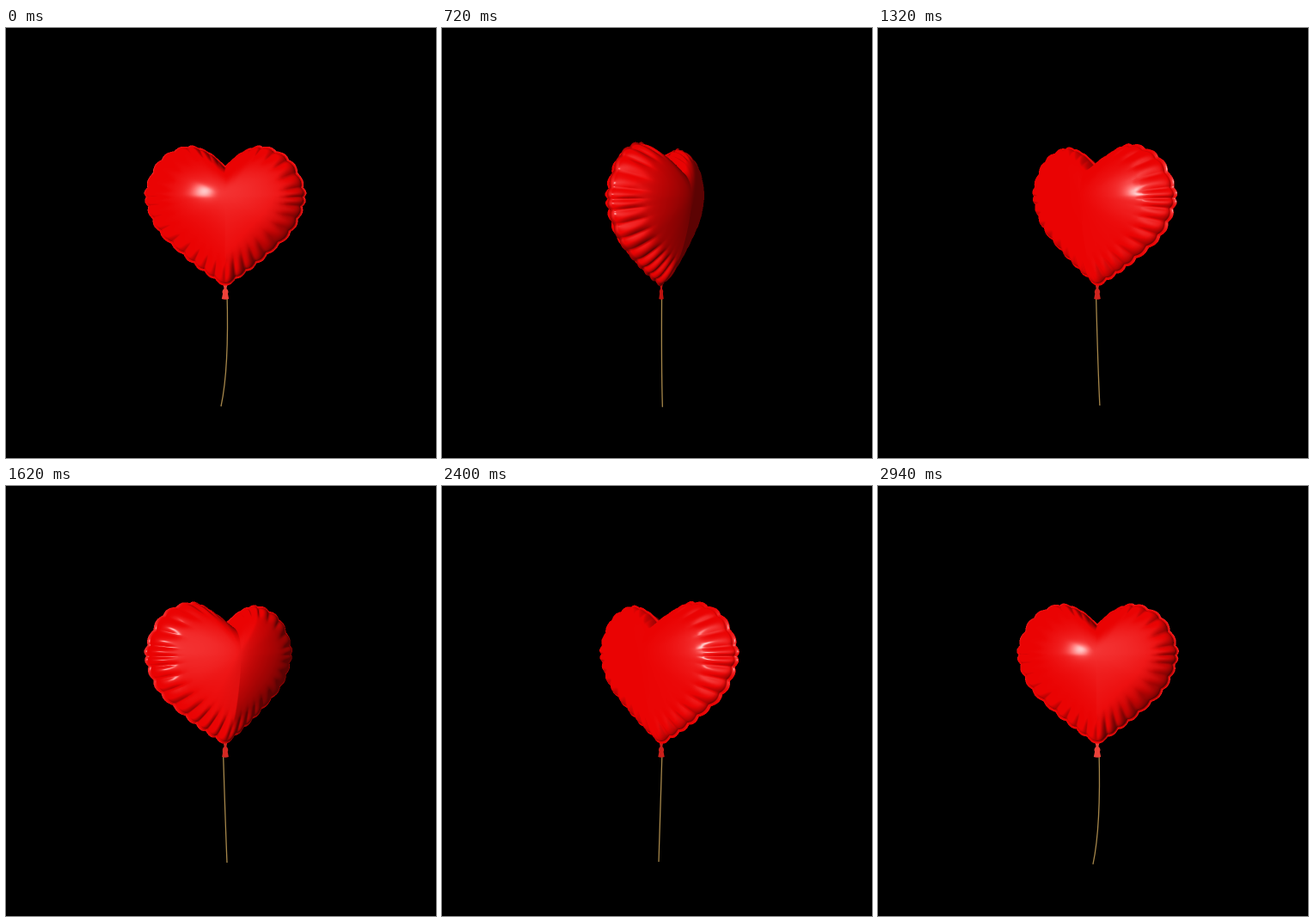
Recreate the animation shown at these times as an HTML page with a canvas. Size 500x500 px, loop 2.97 s.

```html
<!DOCTYPE html>
<html lang="en">
<head>
<meta charset="utf-8">
<title>Heart balloon</title>
<style>
  html, body { margin: 0; width: 100%; height: 100%; overflow: hidden; background: #000; }
  canvas { display: block; width: 500px; height: 500px; }
</style>
</head>
<body>
<canvas id="stage" width="500" height="500"></canvas>
<script>
const LOOP = 2970, STEP = 30;
const CX = 255, CY = 196;              // balloon centre
const EYE_Y = 185, EYE_Z = 420;        // camera height and distance
const DEPTH = 39, CORE = 58, RIM = 3;
const BOX = { x: 145, y: 120, w: 220, h: 190 }, SS = 2;

// time, turn in degrees, string top x, middle x, end x, end y
const poses = [
  [0, 0, 257, 256.5, 250, 440],
  [450, 25, 256, 255, 254, 441],
  [990, 97, 255, 256, 258, 440],
  [1620, 205, 252.5, 255, 257, 438],
  [2040, 277, 254, 253, 255, 437],
  [2400, 328, 256, 253.5, 252, 437]
];
const shifted = (row, dir) => row.map((v, i) => i === 0 ? v + dir * LOOP : i === 1 ? v + dir * 360 : v);
const track = [shifted(poses[5], -1), ...poses, shifted(poses[0], 1), shifted(poses[1], 1)];

// right half of the outline, from notch to tip
const half = [
  [0, 160], [20, 143.5], [45, 136.5], [76, 152], [93, 185],
  [92, 208], [78, 238], [50, 265], [25, 285], [0, 302]
].map(([x, y], i) => [i, x, y - CY]);

// Smooth curve through rows of [t, ...values]
function curve(rows, t) {
  let i = 0;
  while (i < rows.length - 2 && t >= rows[i + 1][0]) i++;
  const a = rows[i], b = rows[i + 1];
  const before = rows[Math.max(0, i - 1)], after = rows[Math.min(rows.length - 1, i + 2)];
  const d = b[0] - a[0], u = (t - a[0]) / d, v = 1 - u;
  return a.slice(1).map((p, k) => {
    const q = b[k + 1];
    const m = (q - before[k + 1]) / (b[0] - before[0]) * d;
    const n = (after[k + 1] - p) / (after[0] - a[0]) * d;
    return p * (1 + 2 * u) * v * v + m * u * v * v + q * u * u * (3 - 2 * u) - n * u * u * v;
  });
}

const clamp = v => Math.max(0, Math.min(1, v));
const smooth = (a, b, v) => { const u = clamp((v - a) / (b - a)); return u * u * (3 - 2 * u); };

// One sheet of foil: rings run outward, the last one is the flat welded rim
const SPAN = half.length - 1, N = SPAN * 32, M = 18, ROWS = M + 2;
const at = (k, j) => ((k + N) % N) * ROWS + j;
const points = [];
for (let k = 0; k < N; k++) {
  const u = k / 16, right = u <= SPAN;
  const [ox, oy] = curve(half, right ? u : 2 * SPAN - u);
  const r = Math.hypot(ox, oy), dx = (right ? ox : -ox) / r, dy = oy / r;
  const pinch = 1 - Math.abs(Math.sin(2 * Math.PI * u));
  const dent = 2.3 * pinch * clamp((r - 43) / 30);
  for (let j = 0; j < ROWS; j++) {
    const s = Math.sin(Math.min(j, M) / M * Math.PI / 2);
    let rad = s * (CORE + (r - RIM - CORE) * s) - dent * s ** 10;
    let z = 0.8 + DEPTH * Math.max(0, 1 - s * s) ** 0.58 * (1 - 0.24 * pinch * smooth(0.74, 0.98, s));
    if (j > M) { rad = r - dent; z = 0; }
    points.push([dx * rad, dy * rad, z]);
  }
}

const normals = points.map((_, i) => {
  const k = Math.floor(i / ROWS), j = i % ROWS;
  if (j === 0) return [0, 0, 1];
  const a = points[at(k - 1, j)], b = points[at(k + 1, j)];
  const c = points[at(k, j - 1)], d = points[at(k, Math.min(ROWS - 1, j + 1))];
  const p = b.map((v, n) => v - a[n]), q = d.map((v, n) => v - c[n]);
  const n = [p[1] * q[2] - p[2] * q[1], p[2] * q[0] - p[0] * q[2], p[0] * q[1] - p[1] * q[0]];
  const len = (Math.hypot(...n) || 1) * (n[2] < 0 ? -1 : 1);
  return n.map(v => v / len);
});

const W = BOX.w * SS, H = BOX.h * SS;
const layer = document.createElement("canvas");
layer.width = W;
layer.height = H;
const layerCtx = layer.getContext("2d");
const image = layerCtx.createImageData(W, H);
const depth = new Float32Array(W * H);
const verts = new Float32Array(points.length * 6);
let glintX, glintZ;

// Turn one sheet (side 1 front, -1 back) and project it
function project(side, turn) {
  const c = Math.cos(turn), s = Math.sin(turn);
  points.forEach(([x, y, z0], i) => {
    const z = z0 * side, [nx, ny, nz0] = normals[i], nz = nz0 * side;
    const zr = z * c - x * s, f = EYE_Z / (EYE_Z - zr), o = i * 6;
    verts[o] = (CX + (x * c + z * s) * f - BOX.x) * SS;
    verts[o + 1] = (EYE_Y + (y + CY - EYE_Y) * f - BOX.y) * SS;
    verts[o + 2] = zr;
    verts[o + 3] = nx * c + nz * s;
    verts[o + 4] = ny;
    verts[o + 5] = nz * c - nx * s;
  });
}

function shade(o, nx, ny, nz) {
  const l = 1 / (Math.hypot(nx, ny, nz) || 1);
  nx *= l; ny *= l; nz *= l;
  const light = Math.max(0, -0.45 * nx - 0.28 * ny + 0.85 * nz);
  const sheen = Math.max(0, 0.1 * nx - 0.08 * ny + 0.99 * nz) ** 16;
  const glint = Math.max(0, glintX * nx - 0.07 * ny + glintZ * nz);
  const white = 44 * sheen + 26 * glint ** 60 + 150 * glint ** 420;
  const px = image.data;
  px[o] = 92 + 142 * Math.min(1, light * 1.6) + white * 0.2;
  px[o + 1] = px[o + 2] = 3 + white;
  px[o + 3] = 255;
}

function triangle(ia, ib, ic) {
  const a = ia * 6, b = ib * 6, c = ic * 6, v = verts;
  const ax = v[a], ay = v[a + 1], bx = v[b], by = v[b + 1], cx = v[c], cy = v[c + 1];
  const area = (bx - ax) * (cy - ay) - (by - ay) * (cx - ax);
  if (area <= 1e-6) return;
  const x0 = Math.max(0, Math.ceil(Math.min(ax, bx, cx) - 0.5));
  const x1 = Math.min(W - 1, Math.floor(Math.max(ax, bx, cx) - 0.5));
  const y0 = Math.max(0, Math.ceil(Math.min(ay, by, cy) - 0.5));
  const y1 = Math.min(H - 1, Math.floor(Math.max(ay, by, cy) - 0.5));
  for (let y = y0; y <= y1; y++) {
    for (let x = x0; x <= x1; x++) {
      const px = x + 0.5, py = y + 0.5;
      const p = ((bx - px) * (cy - py) - (by - py) * (cx - px)) / area;
      const q = ((cx - px) * (ay - py) - (cy - py) * (ax - px)) / area;
      const r = 1 - p - q;
      if (p < -1e-4 || q < -1e-4 || r < -1e-4) continue;
      const mix = n => p * v[a + n] + q * v[b + n] + r * v[c + n];
      const i = y * W + x, z = mix(2);
      if (z <= depth[i]) continue;
      depth[i] = z;
      shade(i * 4, mix(3), mix(4), mix(5));
    }
  }
}

function drawFoil(turn) {
  image.data.fill(0);
  depth.fill(-1e4);
  const tilt = (-11 + 8 * Math.max(0, -Math.sin(2 * turn))) * Math.PI / 180;
  glintX = Math.sin(tilt);
  glintZ = Math.sqrt(1 - glintX * glintX - 0.0049);
  for (const side of [1, -1]) {
    project(side, turn);
    for (let k = 0; k < N; k++) {
      for (let j = 0; j < ROWS - 1; j++) {
        const a = at(k, j), b = at(k + 1, j), c = at(k + 1, j + 1), d = at(k, j + 1);
        if (side > 0) { triangle(a, d, c); triangle(a, c, b); }
        else { triangle(a, c, d); triangle(a, b, c); }
      }
    }
  }
  layerCtx.putImageData(image, 0, 0);
  ctx.drawImage(layer, BOX.x, BOX.y, BOX.w, BOX.h);
}

function drawString(top, mid, end, endY) {
  ctx.beginPath();
  ctx.moveTo(top, 308);
  ctx.quadraticCurveTo(2 * mid - (top + end) / 2, 770 - (308 + endY) / 2, end, endY);
  ctx.strokeStyle = "#a5864a";
  ctx.lineWidth = 1.3;
  ctx.stroke();
}

function drawKnot(turn) {
  const face = Math.abs(Math.cos(turn)), w = 1 + 3.2 * face;
  ctx.beginPath();
  ctx.moveTo(CX - w * 0.6, 298);
  ctx.lineTo(CX - w * 0.35, 303);
  ctx.quadraticCurveTo(CX - w * 1.1, 306, CX - w * 0.7, 309);
  ctx.lineTo(CX - w, 315);
  ctx.quadraticCurveTo(CX, 316.5, CX + w, 315);
  ctx.lineTo(CX + w * 0.7, 309);
  ctx.quadraticCurveTo(CX + w * 1.1, 306, CX + w * 0.35, 303);
  ctx.lineTo(CX + w * 0.6, 298);
  const shine = face ** 8;
  ctx.fillStyle = `rgb(${190 + 46 * shine}, ${18 + 48 * shine}, ${14 + 44 * shine})`;
  ctx.fill();
}

const ctx = document.getElementById("stage").getContext("2d");
let shown = -1;

function frame() {
  const t = Math.floor(performance.now() % LOOP / STEP) * STEP;
  if (t !== shown) {
    shown = t;
    const [deg, top, mid, end, endY] = curve(track, t);
    const turn = deg * Math.PI / 180;
    ctx.fillStyle = "#000";
    ctx.fillRect(0, 0, 500, 500);
    drawString(top, mid, end, endY);
    drawKnot(turn);
    drawFoil(turn);
  }
  requestAnimationFrame(frame);
}
requestAnimationFrame(frame);
</script>
</body>
</html>
```
